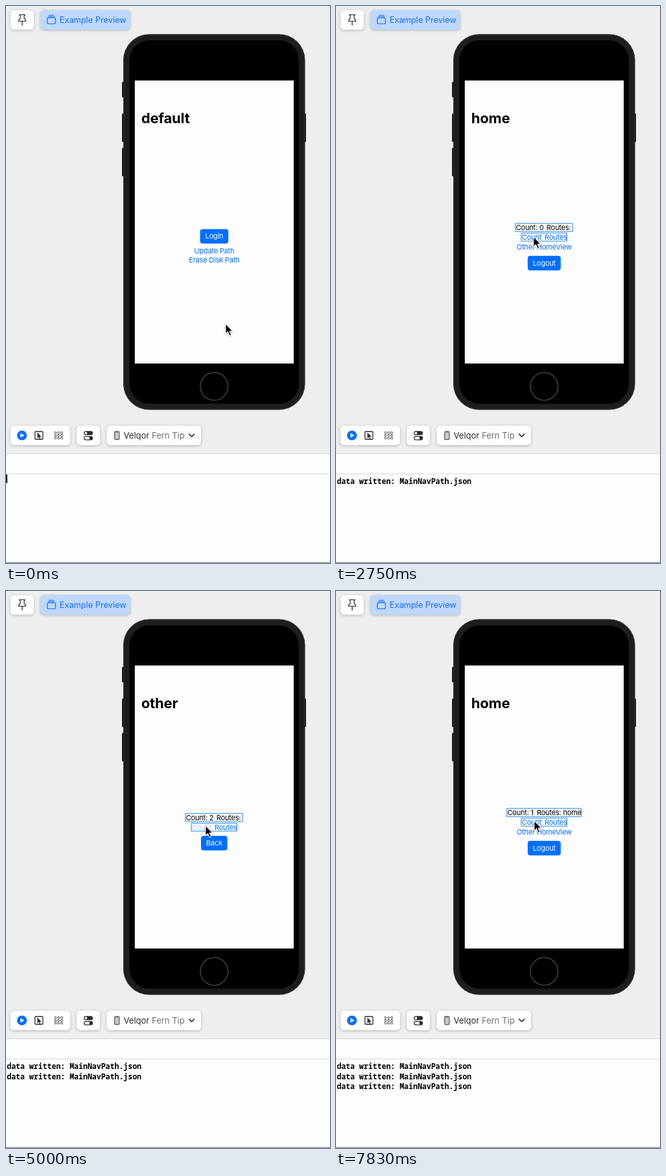
An HTML page with a canvas that plays this animation: 500x860 px, repeating every 8000 ms.

```html
<!DOCTYPE html>
<html lang="en">
<head>
<meta charset="utf-8">
<title>Navigation preview</title>
<style>
html, body { margin: 0; width: 100%; height: 100%; overflow: hidden; background: #eee; }
canvas { display: block; width: 500px; height: 860px; }
</style>
</head>
<body>
<canvas id="stage"></canvas>
<script>
const W = 500, H = 860, LOOP = 8000;
const BLUE = '#006fff', INK = '#2b2b2b', PAPER = '#fdfdfd';
const SCREEN = { x: 198.5, y: 115, w: 245.5, h: 437 };
const MID = 321.3;

const canvas = document.getElementById('stage');
const ctx = canvas.getContext('2d');
const dpr = window.devicePixelRatio || 1;
canvas.width = W * dpr;
canvas.height = H * dpr;

const clamp = v => Math.max(0, Math.min(1, v));
const smooth = v => v * v * (3 - 2 * v);

// cursor stops: time, x, y
const path = [
  [80, 339, 490.5], [720, 333, 356.5], [2250, 333, 356.5], [2700, 305, 356],
  [3050, 305, 356], [3380, 340, 356], [3600, 340, 356], [3850, 334, 370],
  [4680, 334, 370], [4960, 308, 362], [5060, 308, 362], [5300, 338, 362],
  [5560, 338, 362], [5980, 330, 371], [6120, 330, 371], [6410, 335, 390],
  [7400, 335, 390], [7800, 306, 354.5]
];
// page changes: start time, from, to, direction
const moves = [
  [1570, 'default', 'home', 1],
  [4090, 'home', 'other', 1],
  [6730, 'other', 'home', -1]
];
const SLIDE = 580;
const presses = {
  login: [1510, 1600], countHome: [2850, 2960], routesHome: [3450, 3560], other: [3960, 4260],
  countOther: [4850, 4990], routesOther: [5330, 5440], back: [6580, 6740]
};

const spring = s => 1 - (1 + 12 * s) * Math.exp(-12 * s);
const slide = ms => ms >= SLIDE ? 1 : spring(ms / 1000) / spring(SLIDE / 1000);

function pressAlpha(name, t, low) {
  const [a, b] = presses[name];
  if (t < a || t > b + 300) return 1;
  return t < b ? low : low + (1 - low) * (t - b) / 300;
}

function cursorAt(t) {
  let a = path[0];
  for (const b of path) {
    if (t < b[0]) {
      const k = smooth(clamp((t - a[0]) / (b[0] - a[0] || 1)));
      return [a[1] + (b[1] - a[1]) * k, a[2] + (b[2] - a[2]) * k];
    }
    a = b;
  }
  return [a[1], a[2]];
}

function box(x, y, w, h, r, fill) {
  ctx.beginPath();
  ctx.roundRect(x, y, w, h, r);
  if (fill) { ctx.fillStyle = fill; ctx.fill(); }
}

function frame(x, y, w, h, r, color, lw) {
  box(x, y, w, h, r);
  ctx.strokeStyle = color;
  ctx.lineWidth = lw;
  ctx.stroke();
}

function line(points, color, lw, close) {
  ctx.beginPath();
  points.forEach(([x, y], i) => i ? ctx.lineTo(x, y) : ctx.moveTo(x, y));
  if (close) ctx.closePath();
  ctx.strokeStyle = color;
  ctx.lineWidth = lw;
  ctx.stroke();
}

function poly(points, fill) {
  ctx.beginPath();
  points.forEach(([x, y]) => ctx.lineTo(x, y));
  ctx.closePath();
  ctx.fillStyle = fill;
  ctx.fill();
}

function text(str, x, y, { size = 11, weight = 400, color = '#000', align = 'left', track = -0.2, alpha = 1, font = 'Inter, "Open Sans", sans-serif' } = {}) {
  ctx.save();
  ctx.globalAlpha *= alpha;
  ctx.font = `${weight} ${size}px ${font}`;
  ctx.letterSpacing = track + 'px';
  ctx.textAlign = align;
  ctx.fillStyle = color;
  ctx.fillText(str, x, y);
  ctx.restore();
}

function panel(x, y, w, h, fill) {
  ctx.save();
  ctx.shadowColor = 'rgba(0,0,0,.25)';
  ctx.shadowBlur = 4 * dpr;
  ctx.shadowOffsetY = dpr;
  box(x, y, w, h, 5.5, fill);
  ctx.restore();
}

function toolbarTop() {
  panel(7, 6.5, 36, 30, '#fff');
  line([[20.5, 13.5], [29.5, 13.5], [28, 15], [28, 19], [30.5, 22], [30.5, 23.5], [19.5, 23.5], [19.5, 22], [22, 19], [22, 15]], INK, 1.2, true);
  line([[25, 23.5], [25, 29.5]], INK, 1.3);
  panel(53, 6.5, 138.5, 30, '#bed7fc');
  frame(63.7, 18.2, 12.6, 9.3, 2, '#176ff0', 1.2);
  line([[65, 16.2], [75, 16.2]], '#176ff0', 1.1);
  line([[66.5, 14.2], [73.5, 14.2]], '#176ff0', 1.1);
  text('Example Preview', 82.7, 26, { size: 12.8, color: '#176ff0', track: 0 });
}

function toolbarBottom() {
  panel(7, 648, 92, 30, '#fff');
  panel(109, 648, 36, 30, '#fff');
  panel(155.5, 648, 145.5, 30, '#fff');

  ctx.beginPath();
  ctx.arc(24.6, 663, 7.6, 0, 7);
  ctx.fillStyle = BLUE;
  ctx.fill();
  poly([[22.4, 659.5], [22.4, 666.5], [28.4, 663]], '#fff');

  frame(44.7, 657, 12.2, 12, 1.2, INK, 1.3);
  poly([[48.5, 658.5], [48.5, 667.5], [50.6, 665.6], [52, 668.6], [53.2, 668], [51.9, 665.2], [54.6, 665]], INK);

  for (let i = 0; i < 9; i++)
    frame(75 + i % 3 * 4.8, 657.6 + Math.floor(i / 3) * 4.2, 3, 2.6, 0.6, '#555', 0.9);

  box(120, 656.3, 14, 6.2, 3.1, INK);
  box(121.2, 657.5, 4, 3.8, 1.9, '#fff');
  frame(120.6, 664.6, 12.8, 5.2, 2.6, INK, 1.2);
  box(128.6, 664.6, 5, 5.2, 2.6, INK);

  box(167.8, 657, 6.8, 12.4, 1.4, '#c9c9c9');
  frame(167.6, 656.8, 7.2, 12.6, 1.6, '#555', 1.2);
  line([[169.7, 658], [172.7, 658]], '#555', 1);
  text('Velqor', 181.5, 667.6, { size: 13, color: INK, track: 0 });
  text('Fern Tip', 225, 667.6, { size: 13, color: '#6e6e6e', track: 0 });
  line([[282.8, 661.2], [286.6, 665], [290.4, 661.2]], INK, 1.7);
}

function phone() {
  for (const [x, y, h] of [[179, 117, 24], [179, 166, 44], [179, 219, 44], [459, 166, 44]])
    box(x, y, 4, h, 1.5, '#161616');
  box(181, 43.5, 280.5, 580, 40, '#1d1d1d');
  frame(181.8, 44.3, 278.9, 578.4, 39, '#343434', 1);
  box(190.5, 53, 261.5, 561, 31, '#000');
  ctx.beginPath();
  ctx.arc(321.3, 587.3, 21.4, 0, 7);
  ctx.strokeStyle = '#4a4a4a';
  ctx.lineWidth = 1.3;
  ctx.stroke();
}

function button(label, w, y, h, base, alpha = 1) {
  ctx.save();
  ctx.globalAlpha *= alpha;
  box(MID - w / 2, y, w, h, 4, BLUE);
  text(label, MID, base, { color: '#fff', align: 'center' });
  ctx.restore();
}

// outlined label with the two links below it
function counter(y, count, routes, half, countAlpha, routesAlpha) {
  const left = MID - half;
  text('Count: ' + count, left + 0.4, y + 10.4);
  text('Routes: ' + routes, left + (count === 1 ? 46 : 47.5), y + 10.4);
  frame(left, y, half * 2, 12.6, 0, '#2b88e8', 1);
  text('Count', 286.8, y + 25.2, { color: BLUE, alpha: countAlpha });
  text('Routes', 322, y + 25.2, { color: BLUE, alpha: routesAlpha });
  frame(286.3, y + 15, 70, 12.4, 0, '#2b88e8', 1);
}

const pages = {
  default(t) {
    button('Login', 43.6, 344.4, 22.4, 359.4, pressAlpha('login', t, 0.75));
    text('Update Path', MID, 381.7, { color: BLUE, align: 'center' });
    text('Erase Disk Path', MID, 396.4, { color: BLUE, align: 'center' });
  },
  home(t) {
    const named = t >= 3530;
    counter(335.7, t >= 2930 ? 1 : 0, named ? 'home' : '', named ? 57.3 : 44,
      pressAlpha('countHome', t, 0.25), pressAlpha('routesHome', t, 0.25));
    text('Other HomeView', MID, 375.5, { color: BLUE, align: 'center', alpha: pressAlpha('other', t, 0.35) });
    button('Logout', 51, 385.8, 22.4, 400.8);
  },
  other(t) {
    const named = t >= 5410;
    counter(343.4, t >= 4960 ? 2 : 0, named ? 'other,home' : '', named ? 72.5 : 44,
      pressAlpha('countOther', t, 0.25), pressAlpha('routesOther', t, 0.25));
    button('Back', 40.6, 378, 22.4, 393.2, pressAlpha('back', t, 0.75));
  }
};

function page(name, t, dx) {
  ctx.save();
  ctx.translate(dx, 0);
  ctx.fillStyle = PAPER;
  ctx.fillRect(SCREEN.x, SCREEN.y, SCREEN.w, SCREEN.h);
  pages[name](t);
  ctx.restore();
}

const title = (name, dx, alpha = 1) =>
  text(name, 208.8 + dx, 181, { size: 22, weight: 700, alpha });

function screen(t) {
  ctx.save();
  ctx.beginPath();
  ctx.rect(SCREEN.x, SCREEN.y, SCREEN.w, SCREEN.h);
  ctx.clip();

  let name = 'default', active = null;
  for (const m of moves) if (t >= m[0]) { name = m[2]; active = m; }
  if (!active || t >= active[0] + SLIDE) {
    page(name, t, 0);
    title(name, 0);
  } else {
    const [start, from, to, dir] = active;
    const k = slide(t - start);
    const cover = dir > 0 ? k : 1 - k;
    const [under, over] = dir > 0 ? [from, to] : [to, from];
    const dx = (1 - cover) * SCREEN.w, edge = SCREEN.x + dx;

    page(under, t, -0.3 * cover * SCREEN.w);
    ctx.fillStyle = `rgba(0,0,0,${0.12 * cover})`;
    ctx.fillRect(SCREEN.x, SCREEN.y, SCREEN.w, SCREEN.h);
    title(to, 12 * cover, Math.pow(1 - cover, 2));
    const fade = ctx.createLinearGradient(edge - 5, 0, edge, 0);
    fade.addColorStop(0, 'rgba(0,0,0,0)');
    fade.addColorStop(1, 'rgba(0,0,0,.04)');
    ctx.fillStyle = fade;
    ctx.fillRect(edge - 5, SCREEN.y, 5, SCREEN.h);
    page(over, t, dx);
    title(over, dx * 1.13);
  }
  ctx.restore();
}

function consolePane(t) {
  ctx.fillStyle = PAPER;
  ctx.fillRect(0, 691, W, 169);
  ctx.fillStyle = '#d9d9d9';
  ctx.fillRect(0, 691, W, 1);
  ctx.fillRect(0, 722, W, 1);
  ctx.fillStyle = '#8f8f8f';
  ctx.fillRect(0, 858.7, W, 1.3);
  if (t < 200 || (t >= 690 && t < 1180)) {
    ctx.fillStyle = '#000';
    ctx.fillRect(0, 723.5, 2, 13);
  }
  moves.forEach(([start], i) => {
    if (t >= start)
      text('data written: MainNavPath.json', 1.2, 738 + i * 15.7,
        { size: 11.55, weight: 700, track: 0, font: '"Noto Sans Mono", "DejaVu Sans Mono", monospace' });
  });
}

function cursor(t) {
  const [x, y] = cursorAt(t);
  ctx.save();
  ctx.translate(x, y);
  ctx.shadowColor = 'rgba(0,0,0,.3)';
  ctx.shadowBlur = 3 * dpr;
  ctx.shadowOffsetY = dpr;
  poly([[-0.6, -0.8], [-0.6, 16.6], [3.2, 13.4], [6, 19.3], [9.2, 17.9], [6.6, 12.2], [11.6, 11.8]], '#fff');
  ctx.shadowColor = 'transparent';
  poly([[0.4, 1.4], [0.4, 14.4], [3.6, 11.6], [6.4, 17.9], [8, 17.2], [5.2, 11.2], [9.6, 10.9]], '#000');
  ctx.restore();
}

function draw(t) {
  ctx.setTransform(dpr, 0, 0, dpr, 0, 0);
  ctx.fillStyle = '#eee';
  ctx.fillRect(0, 0, W, H);
  ctx.lineCap = ctx.lineJoin = 'round';
  toolbarTop();
  phone();
  screen(t);
  toolbarBottom();
  consolePane(t);
  cursor(t);
}

const begin = performance.now();
function tick() {
  draw((performance.now() - begin) % LOOP);
  requestAnimationFrame(tick);
}
tick();
</script>
</body>
</html>
```
